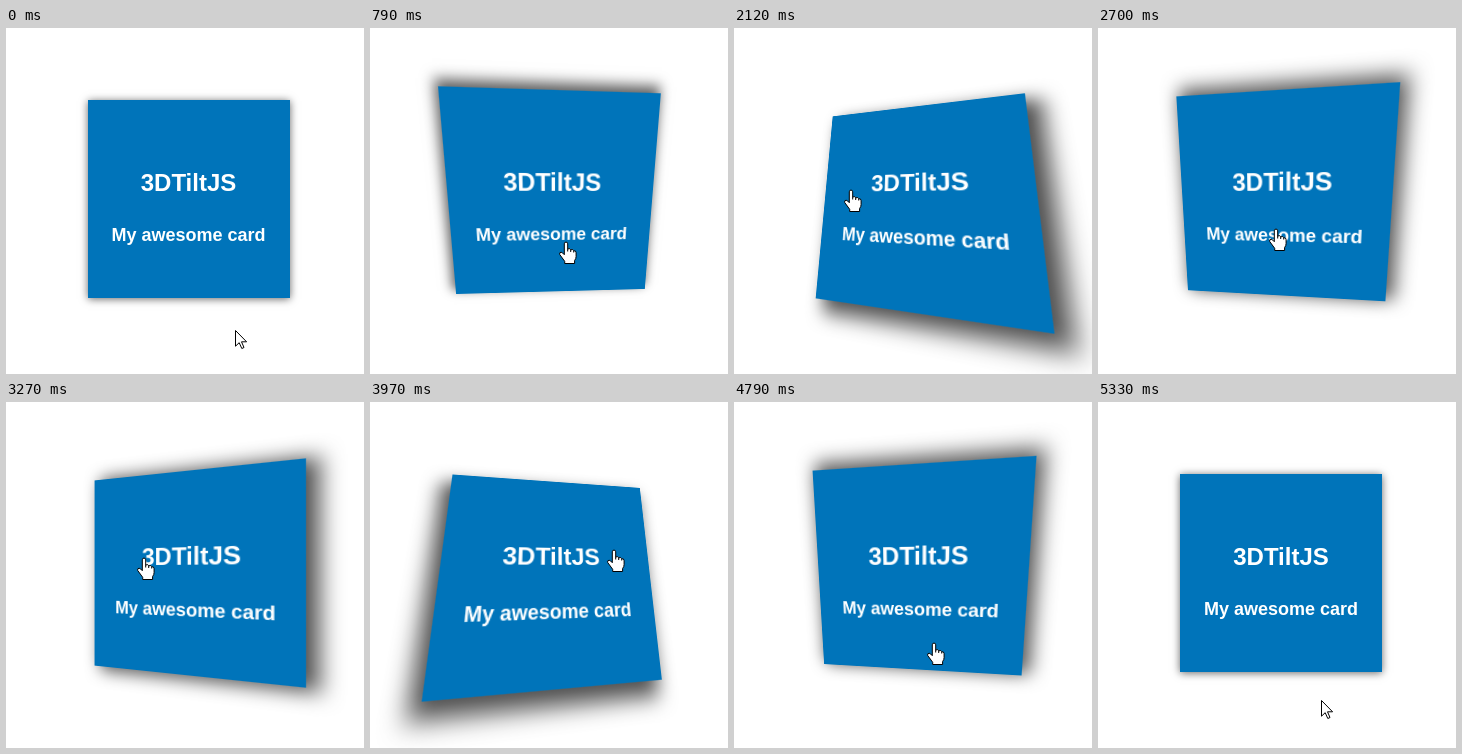
An HTML page for the animation above (5.36 s loop, 358x346 px).

```html
<!DOCTYPE html>
<html lang="en">
<head>
<meta charset="utf-8">
<title>Tilt card</title>
<style>
  html, body { margin: 0; width: 100%; height: 100%; overflow: hidden; background: #fff; }
  #stage { position: relative; width: 358px; height: 346px; overflow: hidden; background: #fff; }
  #card {
    position: absolute; left: 81.5px; top: 72px; width: 202px; height: 198px;
    background: #0074ba; color: #fff; text-align: center; white-space: nowrap;
    font-family: "Liberation Sans", Arial, sans-serif; font-weight: bold;
    transform-origin: 50% 50%;
  }
  #card div { position: absolute; left: 0; right: 0; }
  .title { top: 69px; font-size: 24px; line-height: 28px; }
  .sub { top: 125px; font-size: 18px; line-height: 20px; }
  #pointer { position: absolute; left: 0; top: 0; }
  #pointer path { fill: #fff; stroke: #000; stroke-linejoin: round; }
</style>
</head>
<body>
<div id="stage">
  <div id="card">
    <div class="title">3DTiltJS</div>
    <div class="sub">My awesome card</div>
  </div>
  <svg id="pointer" width="358" height="346" viewBox="0 0 358 346">
    <path id="arrow" d="M.5 .5V16.2L4.2 12.7L6.8 18.5L9 17.5L6.5 11.8H11.6Z"/>
    <g id="hand">
      <path d="M-1.7 1.8a1.7 1.7 0 0 1 3.4 0V7q2.6-1.1 3 .8q2.6-.9 3 .9q2.4-.3 2.4 2V14.5q0 2.3-1.5 4V21.5H-1.3V19.3L-6.3 12.5q-.6-2.2 1.4-2.3q1.6 .4 3.2 2.5Z"/>
      <path d="M1.7 7V9.5M4.7 8V10M7.7 9V10.5" style="fill:none"/>
    </g>
  </svg>
</div>
<script>
  const LOOP = 5360;
  const CENTER = { x: 182.5, y: 171 };
  const HALF_W = 101, HALF_H = 99;
  const LAG = 200;          // the card follows the pointer this much later
  const TILT = 0.00207;     // depth slope per pixel of pointer offset
  const $ = id => document.getElementById(id);
  const card = $('card'), arrow = $('arrow'), hand = $('hand');

  // pointer way-points: time, x, y
  const path = [
    [580, 229, 302], [700, 200, 226], [940, 198, 204], [1160, 217, 134], [1360, 243, 125],
    [1900, 120, 119], [2120, 117, 162], [2360, 132, 195], [2720, 178, 200], [3070, 131, 171],
    [3270, 138, 156], [3420, 160, 119], [3770, 222, 112], [3970, 244, 148], [4180, 180, 160],
    [4590, 152, 201], [4790, 200, 241], [5050, 218, 283], [5330, 223, 298]
  ];

  const clamp = v => Math.max(0, Math.min(1, v));
  const smooth = v => v * v * (3 - 2 * v);
  const ramp = (t, from, to) => smooth(clamp((t - from) / (to - from)));
  const mix = (a, b, k) => a + (b - a) * k;

  function slope(i, axis) {
    const a = path[i - 1], b = path[i + 1];
    return a && b ? (b[axis] - a[axis]) / (b[0] - a[0]) : 0;
  }

  // smooth curve through the way-points, at rest on both ends
  function pointerAt(t) {
    const next = path.findIndex(p => p[0] > t);
    if (next < 0) return path[path.length - 1].slice(1);
    if (next === 0) return path[0].slice(1);
    const i = next - 1, a = path[i], b = path[next];
    const span = b[0] - a[0], u = (t - a[0]) / span;
    return [1, 2].map(axis =>
      mix(a[axis], b[axis], smooth(u)) +
      span * u * (1 - u) * ((1 - u) * slope(i, axis) - u * slope(next, axis)));
  }

  function drawCard(t) {
    const hover = ramp(t, 680, 980) * (1 - ramp(t, 4860, 5280));
    const [px, py] = pointerAt(t - LAG);
    const gx = (CENTER.x - px) * TILT * hover;
    const gy = (CENTER.y - py) * TILT * hover;
    const s = mix(1, 1.035, hover);
    card.style.transform =
      `matrix3d(${s},0,0,${(-gx / HALF_W).toFixed(7)},0,${s},0,${(-gy / HALF_H).toFixed(7)},0,0,1,0,0,0,0,1)`;
    // the shadow slides towards the raised side
    const blur = mix(8, 17, hover), spread = mix(0, 2.5, hover), alpha = mix(.6, .7, hover);
    card.style.boxShadow =
      `${gx * 75}px ${gy * 75 + 1}px ${blur}px ${spread}px rgba(0,0,0,${alpha})`;
  }

  function drawPointer(t) {
    const [x, y] = pointerAt(t).map(Math.round);
    const over = y < CENTER.y + HALF_H;
    arrow.style.display = over ? 'none' : '';
    hand.style.display = over ? '' : 'none';
    (over ? hand : arrow).setAttribute('transform', `translate(${x} ${y})`);
  }

  const start = performance.now();
  function frame() {
    const t = (performance.now() - start) % LOOP;
    drawCard(t);
    drawPointer(t);
    requestAnimationFrame(frame);
  }
  frame();
</script>
</body>
</html>
```
